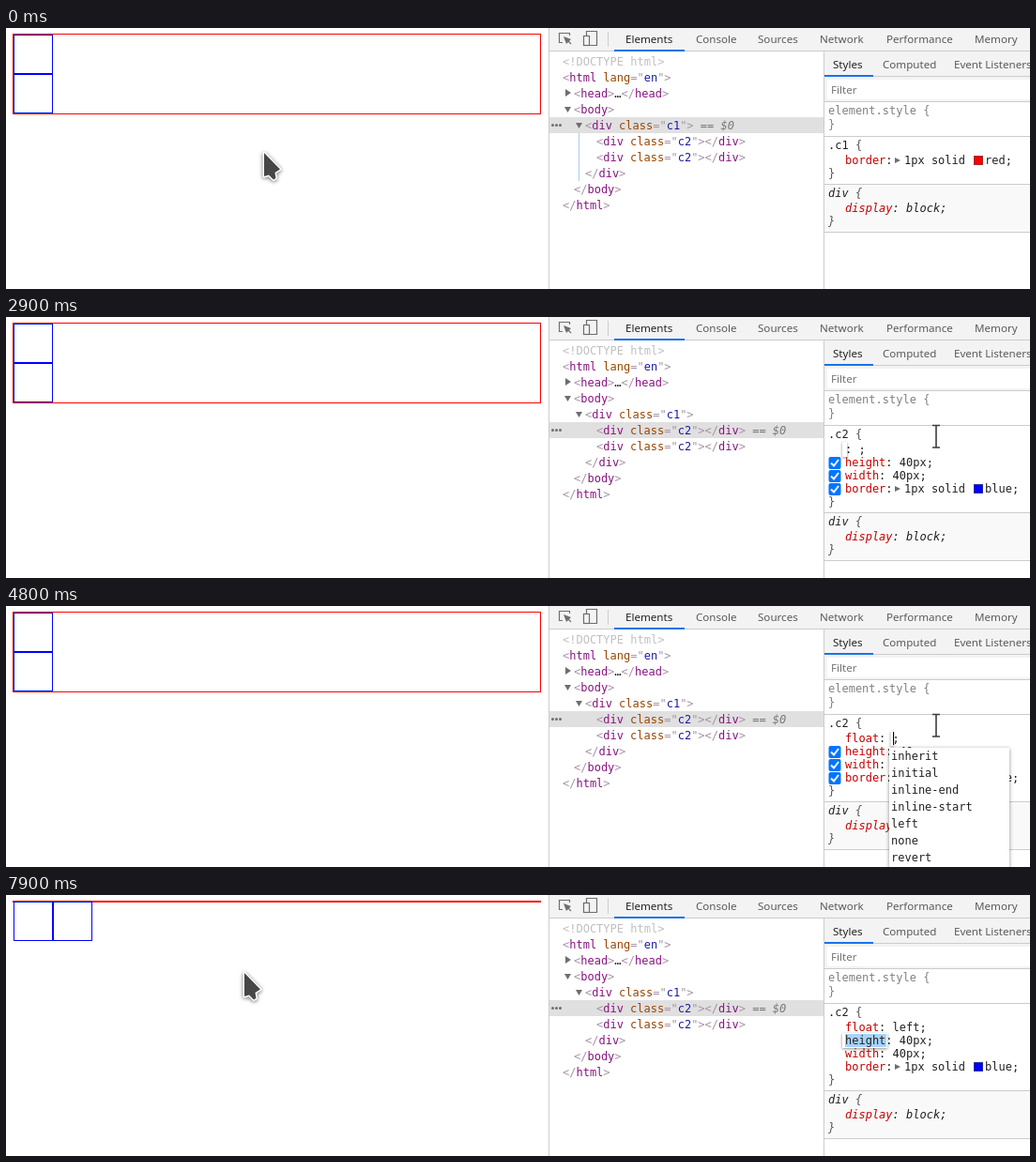
An HTML page with a canvas that plays this animation: 1091 px wide and 278 px high, repeating every 8000 ms.

```html
<!DOCTYPE html>
<html lang="en">
<head>
<meta charset="utf-8">
<style>
html, body { margin: 0; width: 100%; height: 100%; overflow: hidden; background: #fff; }
canvas { display: block; }
</style>
</head>
<body>
<canvas id="stage" width="1091" height="278"></canvas>
<script>
const ctx = document.getElementById('stage').getContext('2d');
const MONO = '12px "DejaVu Sans Mono", monospace';
const UI = '11.6px "Noto Sans", "Open Sans", sans-serif';
const CJK = '"Noto Sans CJK SC", "Noto Sans CJK", sans-serif';
const CHAR = 7.2246, LOOP = 8000;
const RED = '#c80000', INK = '#222', GREY = '#808080', BLUE = '#1a73e8', LINE = '#ccc';

// Latest entry of a [time, value] list that has started
const at = (t, list) => list.filter(([start]) => start <= t).pop()[1];

function rect(x, y, w, h, color) {
  ctx.fillStyle = color;
  ctx.fillRect(x, y, w, h);
}

function frameRect(x, y, w, h, color) {
  ctx.strokeStyle = color;
  ctx.lineWidth = 1;
  ctx.strokeRect(x + 0.5, y + 0.5, w - 1, h - 1);
}

// Text centred on the line y; returns the x where it ends
function text(s, x, y, color = INK, font = MONO) {
  ctx.font = font;
  ctx.fillStyle = color;
  ctx.fillText(s, x, y + 4);
  return x + ctx.measureText(s).width;
}

function shape(points, color) {
  ctx.beginPath();
  for (let i = 0; i < points.length; i += 2) ctx.lineTo(points[i], points[i + 1]);
  ctx.closePath();
  ctx.fillStyle = color;
  ctx.fill();
}

function round(x, y, w, h, r, color) {
  ctx.beginPath();
  ctx.roundRect(x, y, w, h, r);
  ctx.fillStyle = color;
  ctx.fill();
}

function shadowed(blur, draw) {
  ctx.save();
  ctx.shadowColor = 'rgba(0,0,0,.45)';
  ctx.shadowBlur = blur;
  ctx.shadowOffsetY = 1;
  draw();
  ctx.restore();
}

const field = (x, y, w, h = 16) => shadowed(3, () => rect(x, y - h / 2, w, h, '#fff'));

function page(t) {
  const floating = t >= 5900;
  frameRect(7, 6, 563, floating ? 2 : 86, '#f00');
  frameRect(8, 7, 42, 42, '#00f');
  if (floating) frameRect(50, 7, 42, 42, '#00f');
  else frameRect(8, 49, 42, 42, '#00f');
  if (t >= 500 && t < 1500) overlay(t < 1300);
}

function overlay(second) {
  const top = second ? 49 : 7, y = second ? 11 : 57;
  rect(8, top, 42, 42, 'rgba(111,168,220,.66)');
  shadowed(4, () => {
    round(6, y, 112, 29, 2, '#fff');
    shape(second ? [20, 40, 36, 40, 28, 48] : [20, 57, 36, 57, 28, 50], '#fff');
  });
  const x = text('div', 14, y + 14, '#881280', UI);
  text('.c2', x, y + 14, '#1a1aa6', UI);
  text('42 × 42', 66, y + 14, '#555', UI);
}

function markup(s, x, y) {
  const parts = s.match(/<\/?|[>="]|\s+|[\w…]+/g);
  parts.forEach((part, i) => {
    const prev = parts[i - 1] || '';
    const color = part === '…' ? INK
      : !/\w/.test(part) ? '#a894a6'
      : prev[0] === '<' ? '#881280'
      : parts[i + 1] === '=' ? '#994500' : '#1a1aa6';
    x = text(part, x, y, color);
  });
  return x;
}

function toolbar() {
  rect(579, 0, 512, 25, '#f3f3f3');
  rect(579, 24, 512, 1, LINE);
  const tabs = [['Elements', 660], ['Console', 735], ['Sources', 801], ['Network', 867], ['Performance', 938], ['Memory', 1032]];
  tabs.forEach(([s, x], i) => text(s, x, 12, i ? '#5a5a5a' : INK, UI));
  rect(648, 23, 75, 2, BLUE);
  rect(641, 4, 1, 16, LINE);
  ctx.strokeStyle = '#6e6e6e';
  ctx.lineWidth = 1.2;
  ctx.beginPath();
  ctx.moveTo(593, 15.5);
  ctx.lineTo(589.5, 15.5);
  ctx.lineTo(589.5, 5.5);
  ctx.lineTo(600.5, 5.5);
  ctx.lineTo(600.5, 8);
  ctx.moveTo(598, 13);
  ctx.lineTo(602, 17);
  ctx.rect(618.5, 3.5, 11, 15);
  ctx.stroke();
  shape([594, 9, 602, 12, 597, 17], '#6e6e6e');
  rect(615, 8, 7, 11, '#f3f3f3');
  ctx.strokeRect(615.5, 8.5, 6, 10);
}

function tree(t) {
  const selected = t < 1300 ? 4 : 5;
  const rowY = i => 36 + 17 * i;
  rect(579, rowY(selected) - 9, 292, 17, t >= 1300 && t < 2200 ? '#cfe8fc' : '#e0e0e0');
  if (t >= 500 && t < 1300) round(582, rowY(t < 700 ? 6 : 5) - 9, 286, 17, 4, 'rgba(56,121,217,.12)');
  if (selected === 4) rect(610, 112, 1, 51, '#a5cdf0');
  text('<!DOCTYPE html>', 593, rowY(0), '#c0c0c0');
  const rows = [
    ['<html lang="en">', 593], ['<head>…</head>', 605], ['<body>', 605], ['<div class="c1">', 617],
    ['<div class="c2"></div>', 629], ['<div class="c2"></div>', 629], ['</div>', 617], ['</body>', 605], ['</html>', 593]
  ];
  rows.forEach(([s, x], i) => {
    const end = markup(s, x, rowY(i + 1));
    if (i + 1 === selected) text('== $0', end + CHAR, rowY(selected), '#777', 'italic ' + MONO);
  });
  shape([596, 65, 602, 69, 596, 73], '#6e6e6e');
  shape([595, 84, 602, 84, 598.5, 90], '#6e6e6e');
  shape([607, 101, 614, 101, 610.5, 107], '#6e6e6e');
  for (let i = 0; i < 3; i++) round(581 + 4 * i, rowY(selected) - 2, 3, 3, 1.5, '#6e6e6e');
}

function checkbox(y) {
  round(876.5, y - 6, 13, 13, 2, '#0075ff');
  ctx.strokeStyle = '#fff';
  ctx.lineWidth = 2;
  ctx.beginPath();
  ctx.moveTo(879, y + 0.5);
  ctx.lineTo(882, y + 3.5);
  ctx.lineTo(887, y - 3);
  ctx.stroke();
}

function border(y, color) {
  const x = text('border', 894, y, RED);
  text(':', x, y);
  shape([947, y - 3, 953, y, 947, y + 3], '#6e6e6e');
  text('1px solid', 957, y);
  rect(1031, y - 5, 10, 10, '#555');
  rect(1031.5, y - 4.5, 9, 9, color);
  text(color + ';', 1043, y);
}

function property(name, value, y) {
  const x = text(name, 894, y, RED);
  text(`: ${value};`, x, y);
}

const caret = (x, y) => rect(Math.round(x), y - 7, 1, 14, '#000');

function suggestions(x, w, items) {
  shadowed(4, () => rect(x, 151, w, items.length * 18 + 2, '#fff'));
  items.forEach((s, i) => text(s, x + 2, 160 + 18 * i));
}

// The declaration being added, from empty to "float: left"
function newRow(t, pinyin) {
  const y = 141;
  if (t >= 6500) return property('float', 'left', y);
  if (t < 4800) {
    const name = at(t, [[0, ''], [3400, '发'], [3600, '发咯'], [4100, '发咯啊'], [4200, '发咯啊他'], [4400, 'float']]);
    const font = pinyin ? '12px ' + CJK : MONO;
    ctx.font = font;
    const w = ctx.measureText(name).width;
    field(891, pinyin ? 143 : y, w + 5, pinyin ? 18 : 16);
    const end = text(name, 894, pinyin ? 144 : y, INK, font);
    if (pinyin) rect(894, 150, w, 1, INK);
    else if (t < 2900 || name) caret(end, y);
    text(': ;', end, pinyin ? 144 : y);
    return;
  }
  const x = text('float', 894, y, RED);
  const valueX = text(': ', x, y);
  const typed = at(t, [[0, 0], [5900, 1], [6000, 2], [6200, 3]]);
  const value = typed ? 'left' : '';
  field(valueX - 2, y, value.length * CHAR + 3);
  const mid = text(value.slice(0, typed), valueX, y);
  const end = text(value.slice(typed), mid, y, GREY);
  text(';', end, y);
  if (t < 5400 || typed) caret(mid, y);
}

function styles(t) {
  rect(871, 25, 1, 253, LINE);
  rect(872, 25, 219, 54, '#f3f3f3');
  rect(872, 51, 219, 1, LINE);
  rect(872, 50, 52, 2, BLUE);
  text('Styles', 881, 39, INK, UI);
  text('Computed', 934, 39, '#5a5a5a', UI);
  text('Event Listeners', 1010, 39, '#5a5a5a', UI);
  rect(875, 55, 216, 21, '#fff');
  text('Filter', 879, 66, '#757575', UI);
  rect(872, 78, 219, 1, LINE);
  text('element.style {', 876, 88, GREY);
  text('}', 876, 103, GREY);
  rect(872, 115, 219, 1, LINE);

  const c2 = t >= 1400, added = t >= 2300, pinyin = t >= 3400 && t < 4400;
  const checks = t >= 1700 && t < 7600;
  const head = text(c2 ? '.c2' : '.c1', 876, 125);
  text(' {', head, 125, '#555');
  let y = 141;
  if (added) {
    newRow(t, pinyin);
    if (checks && t >= 6500) checkbox(y);
    y += pinyin ? 17 : 14;
  }
  if (c2) {
    const editing = t >= 6500;
    if (editing) {
      field(891, y, 48);
      rect(894, y - 7, 44, 14, '#a8d3fa');
      text(': 40px;', text('height', 894, y), y);
    } else property('height', '40px', y);
    if (checks && !editing) checkbox(y);
    y += 14;
    property('width', '40px', y);
    if (checks) checkbox(y);
    y += 14;
    if (checks) checkbox(y);
  }
  border(y, c2 ? 'blue' : 'red');
  text('}', 876, y + 14, '#555');

  y += 25;
  const italic = 'italic ' + MONO;
  rect(872, y, 219, 52, '#f9f9f9');
  rect(872, y, 219, 1, LINE);
  rect(872, y + 51, 219, 1, LINE);
  text(' {', text('div', 876, y + 10, INK, italic), y + 10, '#555', italic);
  text(': block;', text('display', 894, y + 26, RED, italic), y + 26, INK, italic);
  text('}', 876, y + 40, '#555', italic);

  if (pinyin) inputMethod(t);
  if (t >= 4400 && t < 4800) suggestions(891, 60, ['float']);
  if (t >= 4800 && t < 5900) suggestions(941, 128, ['inherit', 'initial', 'inline-end', 'inline-start', 'left', 'none', 'revert']);
}

function inputMethod(t) {
  const font = '16.4px ' + CJK;
  const keys = at(t, [[3400, 'f'], [3600, 'f l'], [3700, 'f lo'], [4100, 'f lo a'], [4200, 'f lo a t']]);
  const first = at(t, [[3400, '发'], [3600, '发咯'], [4100, '发咯啊'], [4200, '发咯啊他']]);
  shadowed(4, () => round(898, 163, 210, 62, 3, 'rgba(16,16,16,.91)'));
  ctx.strokeStyle = '#000';
  ctx.lineWidth = 2;
  ctx.stroke();
  const end = text(keys, 904, 185, '#fff', font);
  rect(Math.round(end), 173, 1, 20, '#fff');
  let x = text('1.', 904, 209, '#ccc', font);
  x = text(first, x, 209, '#6c9bff', font);
  text(' 2.发 3.分 4.放 5.法', x, 209, '#ccc', font);
}

const PATH = [
  [0, [275, 133]], [400, [470, 131]], [500, [640, 134]], [700, [655, 130]], [800, [672, 127]],
  [900, [685, 123]], [1000, [690, 120]], [1400, [770, 119]], [1500, [840, 118]], [1600, [893, 117]],
  [1700, [935, 121]], [1800, [958, 124]], [1900, [975, 126]], [2000, [986, 127]], [2100, [991, 127]],
  [7600, [850, 98]], [7700, [600, 66]], [7800, [390, 62]], [7900, [254, 83]]
];

function pointer(t) {
  const [x, y] = at(t, PATH);
  ctx.save();
  ctx.translate(x, y);
  if (t >= 1700 && t < 7600) {
    ctx.beginPath();
    ctx.moveTo(-4, -11.5);
    ctx.lineTo(4, -11.5);
    ctx.moveTo(-4, 12);
    ctx.lineTo(4, 12);
    ctx.moveTo(0, -11.5);
    ctx.lineTo(0, 12);
    ctx.lineWidth = 4;
    ctx.strokeStyle = '#fff';
    ctx.stroke();
    ctx.lineWidth = 1.6;
    ctx.strokeStyle = '#3c3c3c';
    ctx.stroke();
  } else {
    const arrow = [0, 0, 17, 17.5, 11.5, 21, 12.5, 27, 10, 28.5, 5, 23.5, 0, 25];
    shadowed(4, () => {
      shape(arrow, '#fff');
      ctx.lineWidth = 3;
      ctx.lineJoin = 'round';
      ctx.strokeStyle = '#fff';
      ctx.stroke();
    });
    shape(arrow, '#464646');
  }
  ctx.restore();
}

function frame(now) {
  const t = now % LOOP;
  rect(0, 0, 1091, 278, '#fff');
  page(t);
  rect(578, 0, 1, 278, LINE);
  toolbar();
  tree(t);
  styles(t);
  pointer(t);
  requestAnimationFrame(frame);
}
requestAnimationFrame(frame);
</script>
</body>
</html>
```
